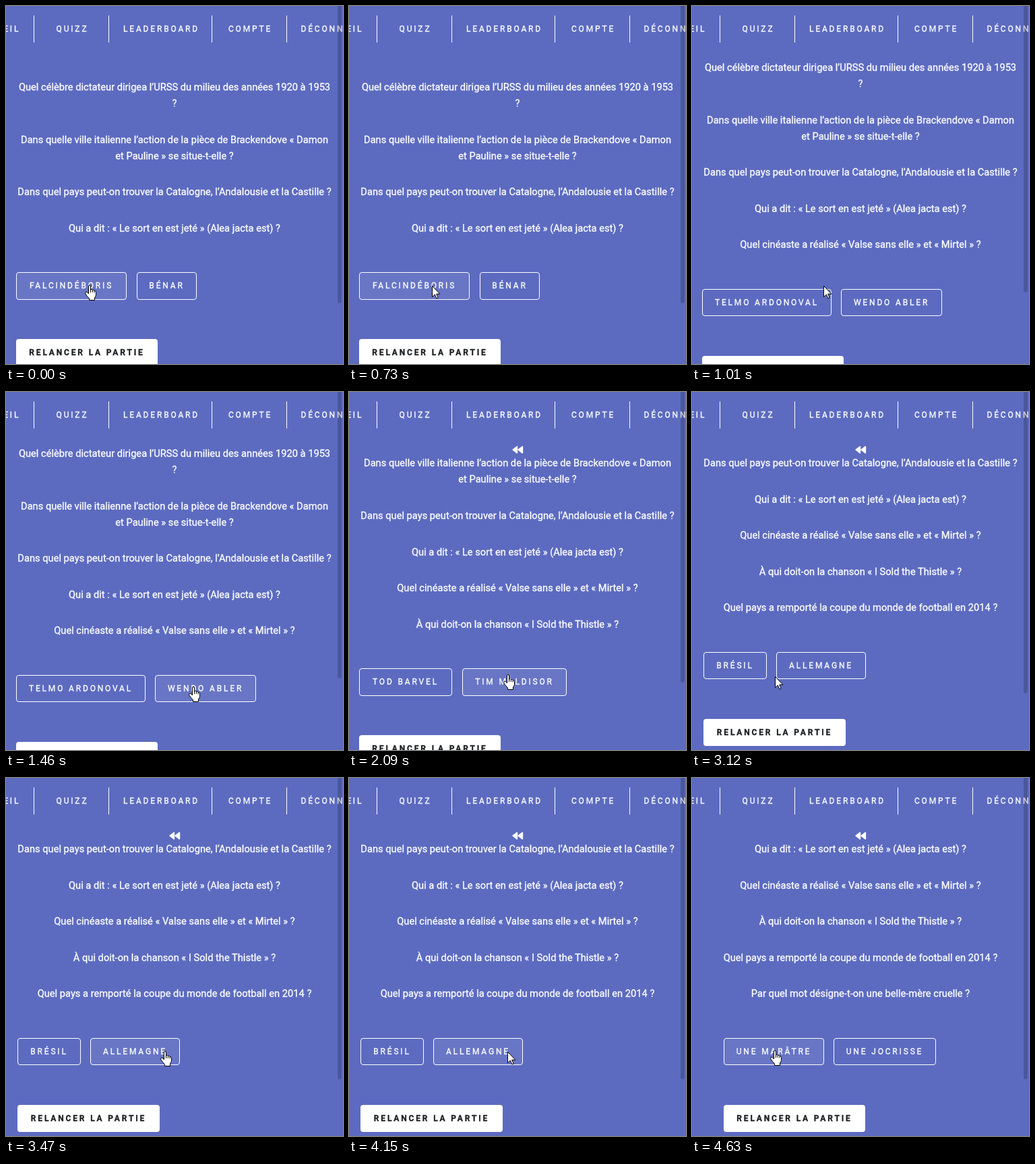
These frames come from a looping animation (500x530 px, 4.67 s). An HTML page:

```html
<!DOCTYPE html>
<html lang="fr">
<head>
<meta charset="utf-8">
<title>Quizz</title>
<style>
html, body { margin: 0; width: 100%; height: 100%; overflow: hidden; background: #5c6bc0; }
svg { display: block; width: 500px; height: 530px; font-family: Roboto, sans-serif; }
text { fill: #fff; stroke: #fff; stroke-width: .3px; text-anchor: middle; white-space: pre; }
.q { font-size: 14.667px; }
.caps { font-size: 12px; letter-spacing: 2.83px; }
.bold { font-weight: 700; fill: #1b1f22; stroke: #1b1f22; }
.btn { fill: #fff; stroke: #fff; }
.mouse { fill: #fff; stroke: #000; stroke-linejoin: round; }
</style>
</head>
<body>
<svg id="stage" viewBox="0 0 500 530">
  <rect width="500" height="530" fill="#5c6bc0"/>
  <g id="nav"></g>
  <g id="scenes"></g>
  <path id="back" fill="#fff" stroke="#fff" stroke-width="2" stroke-linejoin="round"
    d="M249.2 81V90L243.4 85.5ZM257.2 81V90L251.4 85.5Z"/>
  <rect id="thumb" x="492" y="-6" width="6" rx="3" fill="#000" fill-opacity=".19"/>
  <g id="cursor">
    <path id="hand" class="mouse" transform="translate(-6 0)"
      d="M5.5 13V2Q5.6.5 7 .5T8.5 2V7Q11 5.9 11.3 7.6Q13.7 6.8 14.1 8.6Q16.5 8.2 16.5 10.5V14.5Q16.4 16.6 14.5 19V22.5H6.5V20Q3.4 17 .8 12.8Q.2 10.2 2.2 10.1Q3.8 10.4 5.5 13ZM8.5 7V11M11.3 7.6V11M14.1 8.6V11.5"/>
    <path id="arrow" class="mouse" transform="translate(0 1)"
      d="M.5.5V16.8L4.3 13.2L6.9 19L9.2 18L6.7 12.3H11.8Z"/>
  </g>
</svg>
<script>
const NS = 'http://www.w3.org/2000/svg';
const LOOP = 4670, LINE = 24.2, GAP = 53.533, BUTTON = 40.333, FADE = 120;
const $ = id => document.getElementById(id);

function add(parent, tag, attrs, text) {
  const el = document.createElementNS(NS, tag);
  for (const k in attrs) el.setAttribute(k, attrs[k]);
  if (text) el.textContent = text;
  parent.appendChild(el);
  return el;
}

const questions = [
  ['Quel célèbre dictateur dirigea l’URSS du milieu des années 1920 à 1953', '?'],
  ['Dans quelle ville italienne l’action de la pièce de Brackendove « Damon', 'et Pauline » se situe-t-elle ?'],
  ['Dans quel pays peut-on trouver la Catalogne, l’Andalousie et la Castille ?'],
  ['Qui a dit : « Le sort en est jeté » (Alea jacta est) ?'],
  ['Quel cinéaste a réalisé « Valse sans elle » et « Mirtel » ?'],
  ['À qui doit-on la chanson « I Sold the Thistle » ?'],
  ['Quel pays a remporté la coupe du monde de football en 2014 ?'],
  ['Par quel mot désigne-t-on une belle-mère cruelle ?']
];

// from/to: range of questions; y: first baseline; hover: [answer, in, out]
const scenes = [
  { start: 0, from: 0, to: 4, y: 124.8, thumb: 440, replay: [15, 225],
    answers: [['FALCINDÉBORIS', 15, 179], ['BÉNAR', 194, 283]], hover: [[0, -FADE, LOOP]] },
  { start: 790, from: 0, to: 5, y: 95.8, thumb: 424, replay: [15, 225],
    answers: [['TELMO ARDONOVAL', 15, 207], ['WENDO ABLER', 221, 371]], hover: [[1, 1050, LOOP]] },
  { start: 1820, from: 1, to: 6, y: 110.28, thumb: 430, replay: [15, 225],
    answers: [['TOD BARVEL', 15, 153], ['TIM MALDISOR', 168, 323]], hover: [[1, 1820, 2140], [0, 2140, LOOP]] },
  { start: 3120, from: 2, to: 7, y: 110.28, thumb: 446, replay: [17, 228],
    answers: [['BRÉSIL', 17, 111], ['ALLEMAGNE', 125, 258]], hover: [[1, 3180, LOOP]] },
  { start: 4200, from: 3, to: 8, y: 110.28, thumb: 446, replay: [47, 257],
    answers: [['UNE MARÂTRE', 47, 196], ['UNE JOCRISSE', 210, 362]], hover: [[1, 4200, 4360], [0, 4400, LOOP]] }
];

const clamp = v => Math.max(0, Math.min(1, v));
const ease = {
  lin: u => u,
  in: u => u * u,
  out: u => u * (2 - u),
  both: u => u * u * (3 - 2 * u)
};

// time, x, y of the pointer tip, easing towards that point
const path = [
  [0, 123, 413], [790, 123, 413, 'lin'], [1240, 271, 414, 'both'], [1450, 277, 436, 'both'],
  [1810, 277, 436, 'lin'], [2090, 235, 418, 'in'], [2250, 179, 414, 'lin'], [2690, 123, 420, 'out'],
  [3110, 123, 420, 'lin'], [3450, 235, 404, 'both'], [4190, 235, 404, 'lin'], [4610, 122, 403, 'both']
];
const arrowTimes = [[730, 1060], [1770, 1820], [3070, 3190], [4150, 4200]];

function buildNav() {
  const nav = $('nav');
  [['ACCUEIL', -12.5], ['QUIZZ', 98.5], ['LEADERBOARD', 230.5], ['COMPTE', 362.5]]
    .forEach(([label, x]) => add(nav, 'text', { class: 'caps', x, y: 38 }, label));
  add(nav, 'text', { class: 'caps', x: 437.5, y: 38, style: 'text-anchor:start' }, 'DÉCONNEXION');
  [41, 152, 305, 416].forEach(x => add(nav, 'rect', { x, y: 14, width: 1, height: 40, fill: '#fff' }));
}

function buildScene(s) {
  s.el = add($('scenes'), 'g', {});
  let y = s.y;
  questions.slice(s.from, s.to).forEach(lines => {
    lines.forEach((line, i) => {
      add(s.el, 'text', { class: 'q', x: 250, y: Math.round(y + i * LINE) }, line);
    });
    y += GAP + (lines.length - 1) * LINE;
  });
  const edge = y - GAP + 60.6;
  const top = Math.round(edge), bottom = Math.round(edge + BUTTON);
  s.boxes = s.answers.map(([label, l, r]) => {
    const box = add(s.el, 'rect', {
      class: 'btn', x: l + .5, y: top + .5, width: r - l - 1, height: bottom - top - 1, rx: 3.5
    });
    add(s.el, 'text', { class: 'caps', x: (l + r) / 2, y: top + 24 }, label);
    return box;
  });
  const [l, r] = s.replay;
  add(s.el, 'rect', { x: l, y: top + 99, width: r - l, height: 40, rx: 4, fill: '#fff' });
  add(s.el, 'text', { class: 'caps bold', x: (l + r) / 2, y: top + 123 }, 'RELANCER LA PARTIE');
}

function pointer(t) {
  const i = path.findIndex(p => p[0] > t);
  if (i < 0) return path[path.length - 1].slice(1, 3);
  const a = path[i - 1], b = path[i];
  const u = ease[b[3]]((t - a[0]) / (b[0] - a[0]));
  return [1, 2].map(k => Math.round(a[k] + (b[k] - a[k]) * u));
}

function draw(t) {
  const now = scenes.filter(s => s.start <= t).pop();
  scenes.forEach(s => s.el.setAttribute('display', s === now ? 'inline' : 'none'));
  now.boxes.forEach((box, i) => {
    const h = now.hover.find(v => v[0] === i);
    const lit = h ? clamp((t - h[1]) / FADE) - clamp((t - h[2]) / FADE) : 0;
    box.setAttribute('fill-opacity', .075 * lit);
  });
  $('back').setAttribute('display', now.from > 0 ? 'inline' : 'none');
  $('thumb').setAttribute('height', now.thumb + 6);

  // the pointer moves at 25 steps per second
  const tick = Math.max(0, Math.floor((t - 10) / 40) * 40 + 10);
  $('cursor').setAttribute('transform', `translate(${pointer(tick)})`);
  const isArrow = arrowTimes.some(([a, b]) => t >= a && t < b);
  $('arrow').setAttribute('display', isArrow ? 'inline' : 'none');
  $('hand').setAttribute('display', isArrow ? 'none' : 'inline');
}

buildNav();
scenes.forEach(buildScene);
const begin = performance.now();
function frame() {
  draw((performance.now() - begin) % LOOP);
  requestAnimationFrame(frame);
}
frame();
</script>
</body>
</html>
```
